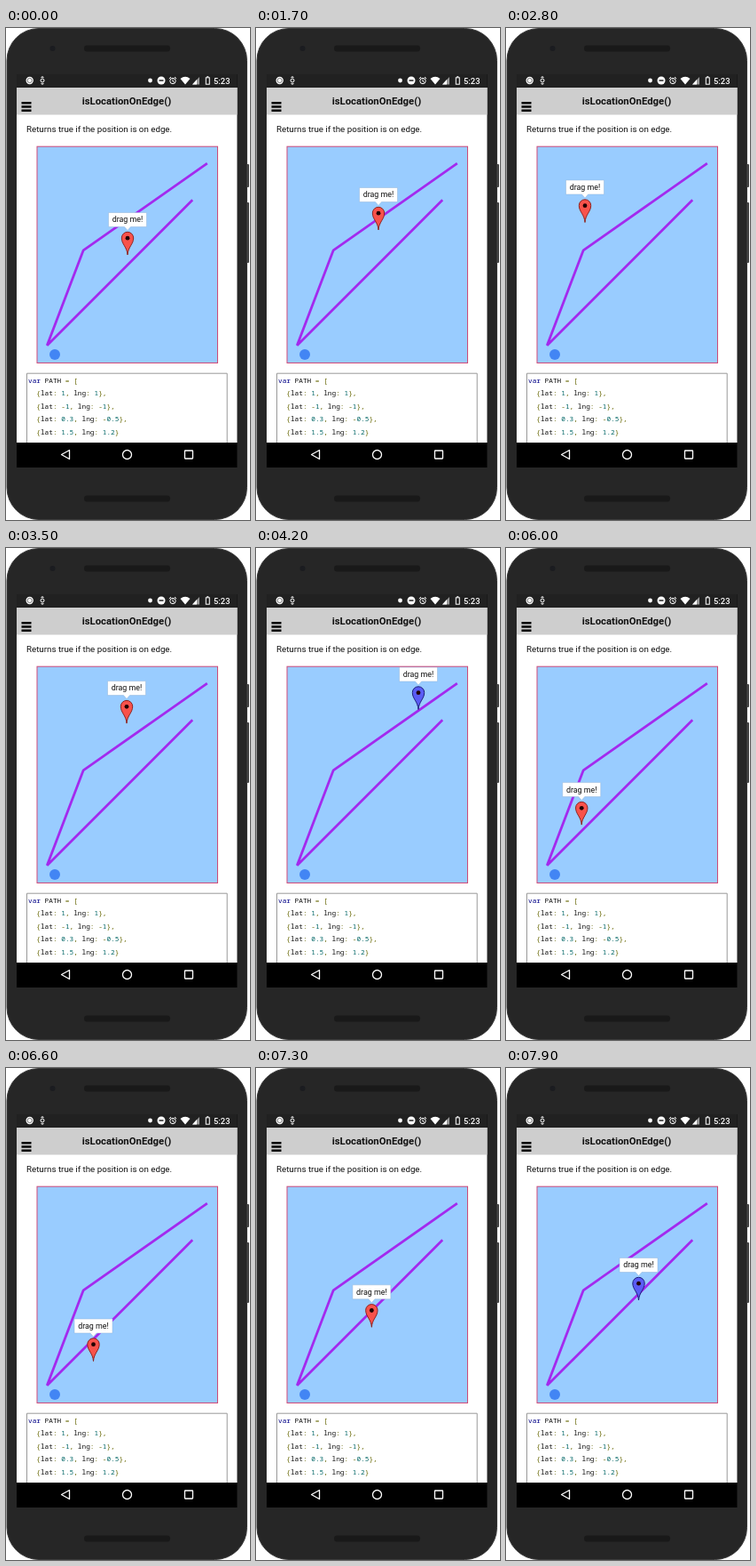
Recreate the animation shown at these times as an HTML page. Size 275 px wide and 553 px high, loop 8000 ms.

```html
<!DOCTYPE html>
<html lang="en">
<head>
<meta charset="utf-8">
<title>isLocationOnEdge()</title>
<style>
  html, body { margin: 0; width: 100%; height: 100%; overflow: hidden; background: #fff; }
  svg { display: block; width: 100%; height: 100%; }
  text { font-family: Roboto, sans-serif; fill: #111; }
  .code text { font: 7.75px "Noto Sans Mono", monospace; white-space: pre; fill: #111; }
  .code .kw { fill: #008; }
  .code .pun { fill: #660; }
  .code .num { fill: #066; }
  .line { fill: none; stroke: #fff; }
</style>
</head>
<body>
<svg viewBox="0 0 275 553">
  <defs>
    <clipPath id="page"><rect x="12" y="67" width="248.5" height="399"/></clipPath>
    <clipPath id="map"><rect x="35" y="133" width="204" height="244"/></clipPath>
  </defs>

  <!-- phone -->
  <g fill="#444">
    <rect x="270" y="153" width="4" height="26" rx="1"/>
    <rect x="270" y="196" width="4" height="68" rx="1"/>
  </g>
  <rect x="1" y="0.5" width="270.5" height="552" rx="36" fill="#262626" stroke="#3a3a3a"/>
  <circle cx="52.5" cy="23" r="3" fill="#1b1c20"/>
  <g fill="#191919">
    <rect x="88" y="19.5" width="97" height="7" rx="3"/>
    <rect x="88" y="525.5" width="97" height="7" rx="3"/>
  </g>
  <rect x="12" y="52" width="248.5" height="442" fill="#000"/>
  <rect x="12" y="52" width="248.5" height="15" fill="#212121"/>

  <!-- status bar -->
  <g class="line" stroke-width="1">
    <circle cx="41" cy="59" r="2"/>
    <path d="M40 56V55H42V56M40 62V63H42V62"/>
    <circle cx="188" cy="59.5" r="3.2"/>
    <path d="M188 57.5V60L189.5 61M183.8 57L186 55M192.2 57L190 55"/>
    <rect x="225.3" y="55.8" width="4" height="7.4"/>
  </g>
  <g fill="#fff">
    <circle cx="26.7" cy="59" r="4.2"/>
    <circle cx="162.5" cy="59" r="2.4"/>
    <circle cx="175" cy="59" r="4.5"/>
    <path d="M196.5 57Q202 52.5 207.5 57L202 63.5Z"/>
    <path d="M210 63.5L218 55V63.5Z" fill="#999"/>
    <path d="M210 63.5L215 58V63.5Z"/>
    <rect x="226.3" y="54.2" width="2" height="1.2"/>
    <text x="234" y="62.6" font-size="9.4" font-weight="500" style="fill:#fff">5:23</text>
  </g>
  <circle cx="26.7" cy="59" r="2.6" fill="none" stroke="#555" stroke-width=".8"/>
  <path d="M172.5 59H177.5" stroke="#212121" stroke-width="1.5"/>

  <!-- page -->
  <g clip-path="url(#page)">
    <rect x="12" y="67" width="249" height="399" fill="#fff"/>
    <rect x="12" y="67" width="249" height="30.5" fill="#cecece"/>
    <path d="M17.5 84.2H28.5M17.5 88.5H28.5M17.5 92.8H28.5" stroke="#000" stroke-width="2.4"/>
    <text x="85.7" y="86.1" font-size="11.35" font-weight="700">isLocationOnEdge()</text>
    <text x="23" y="117" font-size="9.75">Returns true if the position is on edge.</text>
    <rect x="35" y="133" width="204" height="244" fill="#9cf"/>
    <path d="M226.8 152.2L87.2 249.8L46.3 356.8L210.2 193.3" fill="none" stroke="#a32aee" stroke-width="2.8"/>
    <circle cx="55" cy="367" r="6" fill="#4285f4"/>
    <g clip-path="url(#map)">
      <g id="marker">
        <path d="M-21.5-47.5H21.5V-31.5H3.5L0-27.5L-3.5-31.5H-21.5Z" fill="#fff" stroke="#8fb3d9" stroke-width=".5"/>
        <text y="-36.6" font-size="8.9" text-anchor="middle">drag me!</text>
        <path id="pin" d="M0 0C-.6-9-6.7-12-6.7-19A6.7 6.7 0 0 1 6.7-19C6.7-12 .6-9 0 0Z"/>
        <circle cy="-18.8" r="2.4" fill="#200"/>
      </g>
    </g>
    <rect x="35" y="133.2" width="203.5" height="243.3" fill="none" stroke="#d04a78"/>
    <path d="M23.5 470V388.2H249.2V470" fill="none" stroke="#999"/>
    <g class="code" id="code"></g>
  </g>

  <!-- navigation bar -->
  <g class="line" stroke-width="1.3">
    <path d="M62.5 479.5L71.5 474.5V484.5Z" stroke-linejoin="round"/>
    <circle cx="136.5" cy="479.5" r="5"/>
    <rect x="201.5" y="475" width="9" height="9" rx=".5"/>
  </g>
</svg>
<script>
const $ = id => document.getElementById(id);
const LOOP = 8000, STEP = 100;

const LINES = [
  'var PATH = [',
  '  {lat: 1, lng: 1},',
  '  {lat: -1, lng: -1},',
  '  {lat: 0.3, lng: -0.5},',
  '  {lat: 1.5, lng: 1.2}',
  ']'
];
const paint = s => s.replace(/(var)|([\d.]+)|([{}[\]:,=-]+)/g, (m, kw, num) =>
  `<tspan class="${kw ? 'kw' : num ? 'num' : 'pun'}">${m}</tspan>`);
$('code').innerHTML = LINES.map((s, i) =>
  `<text x="25" y="${399 + i * 14.45}" xml:space="preserve">${paint(s)}</text>`).join('');

// time, x, y of the pin's tip; it is lifted by a long press, then dragged
const PATH = [
  [2100, 138, 227], [2800, 89, 218.5], [4200, 183, 181.5],
  [5300, 77.5, 268], [6600, 98.5, 329.5], [7900, 149.5, 261]
];
// spans in which the tip lies on an edge
const ON_EDGE = [[4000, 5200], [6200, 6300], [7700, 8000]];

const slope = (i, k) => (PATH[i + 1][k] - PATH[i][k]) / (PATH[i + 1][0] - PATH[i][0]);

// monotone tangent: zero at turning points and at both ends
function tangent(i, k) {
  if (i === 0 || i === PATH.length - 1) return 0;
  const a = slope(i - 1, k), b = slope(i, k);
  return a * b > 0 ? 2 * a * b / (a + b) : 0;
}

function along(t, k) {
  let i = 0;
  while (i < PATH.length - 2 && t >= PATH[i + 1][0]) i++;
  const p = PATH[i], q = PATH[i + 1], d = q[0] - p[0];
  const u = Math.min(1, Math.max(0, (t - p[0]) / d)), v = 1 - u;
  return v * v * (1 + 2 * u) * p[k] + u * u * (3 - 2 * u) * q[k]
    + d * u * v * (v * tangent(i, k) - u * tangent(i + 1, k));
}

function draw(now) {
  const t = Math.floor(now % LOOP / STEP) * STEP;
  const [x, y] = t < 1700 ? [137, 255] : [along(t, 1), along(t, 2)];
  const blue = ON_EDGE.some(([a, b]) => t >= a && t < b);
  $('marker').setAttribute('transform', `translate(${x.toFixed(2)} ${y.toFixed(2)})`);
  $('pin').setAttribute('fill', blue ? '#5a5cf5' : '#f8524b');
  $('pin').setAttribute('stroke', blue ? '#1c1c78' : '#8c2320');
}

const start = performance.now();
function tick() {
  draw(performance.now() - start);
  requestAnimationFrame(tick);
}
tick();
</script>
</body>
</html>
```
